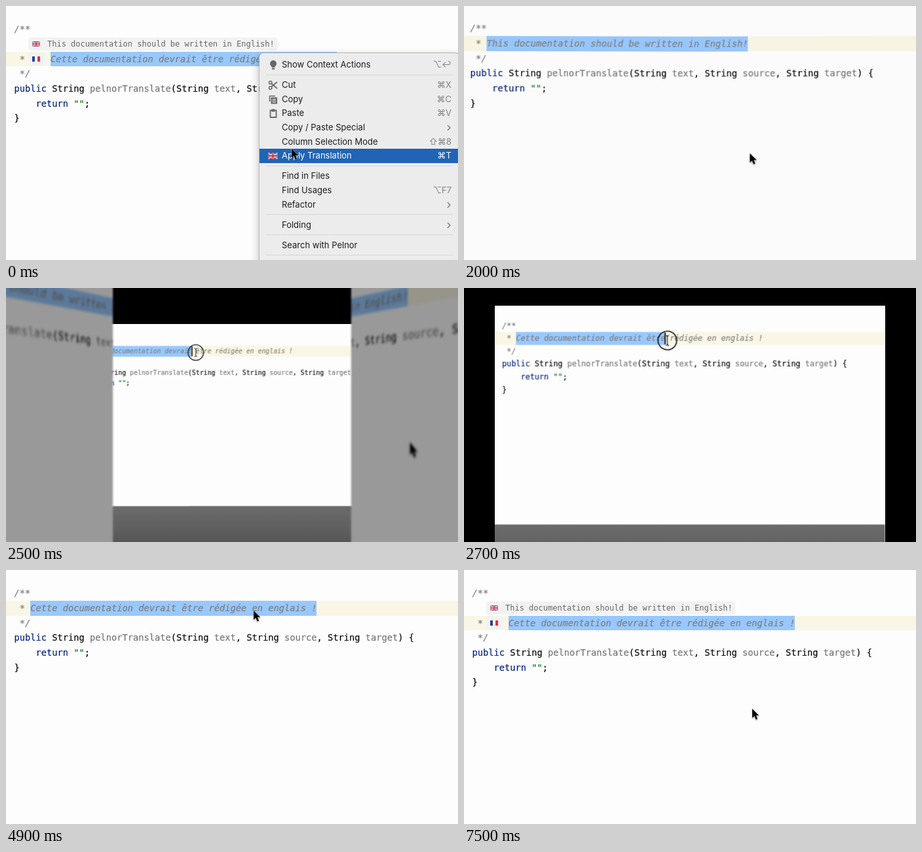
Animation of 690x388 px, one loop 8000 ms. Source, as an HTML page:

```html
<!DOCTYPE html>
<html lang="en">
<head>
<meta charset="utf-8">
<title>Translate documentation</title>
<style>
html, body { margin: 0; width: 100%; height: 100%; overflow: hidden; background: #000; }
#stage { position: relative; width: 690px; height: 388px; overflow: hidden; background: #000; perspective: 930px; }
#stage div, #stage svg.abs { position: absolute; }
.slide { left: 0; top: 0; width: 690px; height: 388px; background: #fdfdfd; color: #0c0c0c;
  font: 13.71px "DejaVu Sans Mono", monospace; }
.row { left: 12.4px; height: 22.65px; line-height: 23.6px; white-space: pre; -webkit-text-stroke: .2px currentcolor; }
.caret-row { left: 0; width: 690px; height: 22.65px; background: #faf6e5; }
.sel { height: 22.65px; background: #98c8fe; }
.row i { color: #7e7e7e; }
.row b { font-weight: 400; color: #08267f; }
.row u { text-decoration: none; color: #777; }
.row s { text-decoration: none; color: #067d17; }
.hint { height: 20px; border-radius: 4px; background: #f2f2f1; color: #666; line-height: 20px; font-size: 12px; white-space: pre; }
.hint svg { position: absolute; left: 6px; top: 6px; }
.hint span { position: absolute; left: 29px; }
/* The doors overlap slightly so that no seam shows while closed */
.door { top: 0; width: 346px; height: 388px; overflow: hidden; }
#left { left: 0; transform-origin: 0 50%; }
#right { left: 344px; transform-origin: 100% 50%; }
#right .slide { left: -344px; }
.floor { left: 0; top: 100%; width: 100%; height: 100%; background: linear-gradient(#6c6c6c, #000); }
.menu { width: 305px; height: 400px; padding-top: 7px; box-sizing: border-box; border-radius: 6px; background: #ececec;
  box-shadow: 0 0 0 .7px #aaa, 0 5px 14px rgba(0,0,0,.3); color: #1c1c1c; font: 13px Inter, "DejaVu Sans", sans-serif; }
#stage .item, #stage .sep { position: relative; height: 21.7px; line-height: 21.7px; white-space: pre; }
#stage .sep { height: 9.3px; }
.sep::after { content: ""; position: absolute; left: 10px; right: 10px; top: 4px; height: 1px; background: #d6d6d6; }
.item span { position: absolute; left: 34px; }
.item em { position: absolute; right: 12px; font-style: normal; color: #808080; }
.item svg { position: absolute; left: 13px; top: 3px; }
.item svg.more { left: auto; right: 13px; top: 6px; }
.item.on { background: #2064b6; }
.item.on, .item.on em { color: #fff; }
</style>
</head>
<body>
<div id="stage"></div>
<script>
const svg = (w, h, box, body, cls = '') =>
  `<svg class="${cls}" width="${w}" height="${h}" viewBox="${box}">${body}</svg>`;
const stroke = (d, color, width) => `<path d="${d}" fill="none" stroke="${color}" stroke-width="${width}"/>`;

const ukFlag = (w, h) => {
  const diagonals = 'M0 0L60 40M60 0L0 40', cross = 'M30 0V40M0 20H60';
  return svg(w, h, '0 0 60 40', '<path d="M0 0H60V40H0Z" fill="#233f8c"/>' +
    stroke(diagonals, '#fff', 8) + stroke(diagonals, '#d0243c', 3) +
    stroke(cross, '#fff', 14) + stroke(cross, '#d0243c', 8));
};
const frFlag = svg(12, 8, '0 0 12 8',
  '<path d="M0 0H4V8H0Z" fill="#21409a"/><path d="M4 0H8V8H4Z" fill="#fff"/><path d="M8 0H12V8H8Z" fill="#e0303c"/>');

const gray = '#696969';
const icon = body => svg(16, 16, '0 0 16 16', body);
const icons = {
  bulb: icon(`<circle cx="8" cy="6" r="5" fill="${gray}"/><path d="M5.5 10H10.5V12H5.5ZM6 13H10V15H6Z" fill="${gray}"/>`),
  cut: icon(stroke('M5 5.5L14 13M5 10.5L14 3', gray, 1.7) +
    `<g fill="none" stroke="${gray}" stroke-width="1.6"><circle cx="3.7" cy="4" r="2.2"/><circle cx="3.7" cy="12" r="2.2"/></g>`),
  copy: icon(stroke('M2.5 11V2.5H11', gray, 1.6) + `<path d="M4.5 4.5H14V14.5H4.5Z" fill="${gray}"/>` +
    stroke('M6.5 7.5H12M6.5 9.7H12M6.5 12H12', '#ececec', 1)),
  paste: icon(stroke('M3.5 3.5H12.5V14H3.5Z', gray, 1.8) + `<path d="M5.5 1.5H10.5V5.5H5.5Z" fill="${gray}"/>`),
  flag: ukFlag(15, 10).replace('class=""', 'style="top:6px"'),
};
const more = svg(6, 10, '0 0 6 10', stroke('M1 1L5 5L1 9', '#777', 1.4), 'more');

const arrow = (id, x, y) => `<svg ${id} class="abs" style="left:${x}px;top:${y}px;filter:drop-shadow(0 1px 1px #0005)"
  width="11" height="17" overflow="visible"><path d="M0 0V14L3.2 11L5.6 16.5L8.2 15.4L5.9 10.2H10.3Z"
  fill="#000" stroke="#fff" stroke-width="1" paint-order="stroke"/></svg>`;

const PITCH = 22.65, TOP = 24.4, TEXT_X = 37.2, CHAR = 8.254;
const french = 'Cette documentation devrait être rédigée en englais !';
const english = 'This documentation should be written in English!';
const rowTop = n => TOP + n * PITCH;

function editor(caretRow, textX, text, extra = '') {
  const rows = [
    [0, '<i>/**</i>'],
    [caretRow, `<i> * <span style="margin-left:${textX - TEXT_X}px">${text}</span></i>`],
    [caretRow + 1, '<i> */</i>'],
    [caretRow + 2, '<b>public</b> String <u>pelnorTranslate</u>(String <u>text</u>, String <u>source</u>, String <u>target</u>) {'],
    [caretRow + 3, '    <b>return</b> <s>""</s>;'],
    [caretRow + 4, '}'],
  ];
  return `<div class="caret-row" style="top:${rowTop(caretRow)}px"></div>
    <div class="sel" style="left:${textX}px;top:${rowTop(caretRow)}px;width:${text.length}ch"></div>` +
    rows.map(([n, html]) => `<div class="row" style="top:${rowTop(n)}px">${html}</div>`).join('') + extra;
}

const hint = (x, y, w, body) => `<div class="hint" style="left:${x}px;top:${y}px;width:${w}px">${body}</div>`;
const hints = hint(34, 48, 380, ukFlag(12, 8) + `<span>${english}</span>`) + hint(34, 71, 26, frFlag);

const items = label => [
  ['Show Context Actions', '⌥↩', 'bulb'], null,
  ['Cut', '⌘X', 'cut'], ['Copy', '⌘C', 'copy'], ['Paste', '⌘V', 'paste'],
  ['Copy / Paste Special', more], ['Column Selection Mode', '⇧⌘8'], [label, '⌘T', 'flag'], null,
  ['Find in Files', ''], ['Find Usages', '⌥F7'], ['Refactor', more], null,
  ['Folding', more], null, ['Search with Pelnor', ''], null, ['Go To', more],
];
const menu = (id, x, y, label) => `<div id="${id}" class="menu" style="left:${x}px;top:${y}px">` +
  items(label).map(item => {
    if (!item) return '<div class="sep"></div>';
    const [name, key, pic] = item;
    return `<div class="item">${icons[pic] || ''}<span>${name}</span>${key === more ? more : `<em>${key}</em>`}</div>`;
  }).join('') + '</div>';

const englishSlide = `<div class="slide">${editor(1, TEXT_X, english, arrow('', 436, 225))}</div>`;
const dragMarks = `<div id="caret" style="top:48px;width:1.6px;height:21px;background:#000"></div>
  <svg id="beam" class="abs" width="1" height="1" overflow="visible">
  <circle id="ring" r="16.5" fill="none" stroke="#111" stroke-width="1.9"/>
  ${stroke('M-3 -9Q0 -9 0 -6Q0 -9 3 -9M0 -6V6M-3 9Q0 9 0 6Q0 9 3 9', '#111', 1.3)}</svg>`;

document.getElementById('stage').innerHTML =
  `<div id="hinted" class="slide">${editor(2, 68.1, french, hints)}</div>
   <div id="plain" class="slide">${editor(1, TEXT_X, french, dragMarks)}<div class="floor"></div></div>
   <div id="left" class="door">${englishSlide}</div><div id="right" class="door">${englishSlide}</div>` +
  menu('applyMenu', 387, 72, 'Apply Translation') + menu('translateMenu', 377, 57, 'Translate') +
  arrow('id="arrow"', 0, 0);

const $ = id => document.getElementById(id);
const show = (id, on) => { $(id).style.visibility = on ? 'visible' : 'hidden'; };
const clamp = v => Math.min(1, Math.max(0, v));
const ease = u => .5 - .5 * Math.cos(Math.PI * clamp(u));

// Pointer stops: time, x, y
const arrowPath = [[0, 436, 218], [200, 436, 218], [400, 436, 225], [4200, 479, 64], [4900, 378, 62],
  [5700, 378, 62], [6200, 430, 231], [6500, 440, 212], [8000, 440, 212]];

function arrowAt(t) {
  const i = arrowPath.findIndex(stop => stop[0] > t);
  const [t0, x0, y0] = arrowPath[i - 1], [t1, x1, y1] = arrowPath[i];
  const u = ease((t - t0) / (t1 - t0));
  return [x0 + (x1 - x0) * u, y0 + (y1 - y0) * u];
}

function drawDoorway(t) {
  const DEPTH = 815, p = ease((t - 1930) / 1070);
  for (const [id, side] of [['left', 1], ['right', -1]]) {
    const style = $(id).style;
    style.display = t >= 1100 && t < 3000 ? 'block' : 'none';
    style.transform = p ? `translateZ(${p * DEPTH}px) rotateY(${side * 101 * p}deg)` : 'none';
    style.filter = p ? `brightness(${1 - .72 * p}) blur(${1.8 * Math.sin(Math.PI * p)}px)` : 'none';
  }
  $('plain').style.display = t > 1930 && t < 7000 ? 'block' : 'none';
  $('plain').style.transform = p < 1 ? `translateZ(${(p - 1) * DEPTH}px)` : 'none';
}

function drawDrag(t) {
  const x = Math.min(479, 417 + (t - 3300) * .186);
  const chars = Math.min(french.length, Math.floor((x - TEXT_X) / CHAR));
  $('plain').querySelector('.sel').style.width = chars + 'ch';
  $('caret').style.left = TEXT_X + chars * CHAR - 1 + 'px';
  $('caret').style.display = t < 3800 ? 'block' : 'none';
  $('beam').style.display = t < 4300 ? 'block' : 'none';
  $('ring').style.display = t < 4100 ? 'inline' : 'none';
  $('beam').style.left = x + 'px';
  $('beam').style.top = 61 + 6 * clamp((t - 2500) / 1400) + 'px';
}

function drawMenu(id, from, hoverFrom, click, t, pointerY) {
  const el = $(id), gone = click + 200;
  show(id, t >= from && t < gone);
  el.style.opacity = t >= click + 100 ? .5 : 1;
  const y = pointerY + 5.5 - el.offsetTop;
  const hovering = t >= hoverFrom && t !== click;
  for (const item of el.querySelectorAll('.item'))
    item.classList.toggle('on', hovering && y >= item.offsetTop && y < item.offsetTop + item.offsetHeight);
}

function draw(now) {
  const t = Math.floor(now % 8000 / 100) * 100;
  const [x, y] = arrowAt(t);
  show('hinted', t < 1100 || t >= 7000);
  drawDoorway(t);
  drawDrag(t);
  drawMenu('applyMenu', 0, 0, 800, t, y);
  drawMenu('translateMenu', 5000, 5800, 6800, t, y);
  show('arrow', t < 1100 || t >= 4300);
  $('arrow').style.left = x + 'px';
  $('arrow').style.top = y + 'px';
}

const start = performance.now();
function tick() {
  draw(performance.now() - start);
  requestAnimationFrame(tick);
}
tick();
</script>
</body>
</html>
```
